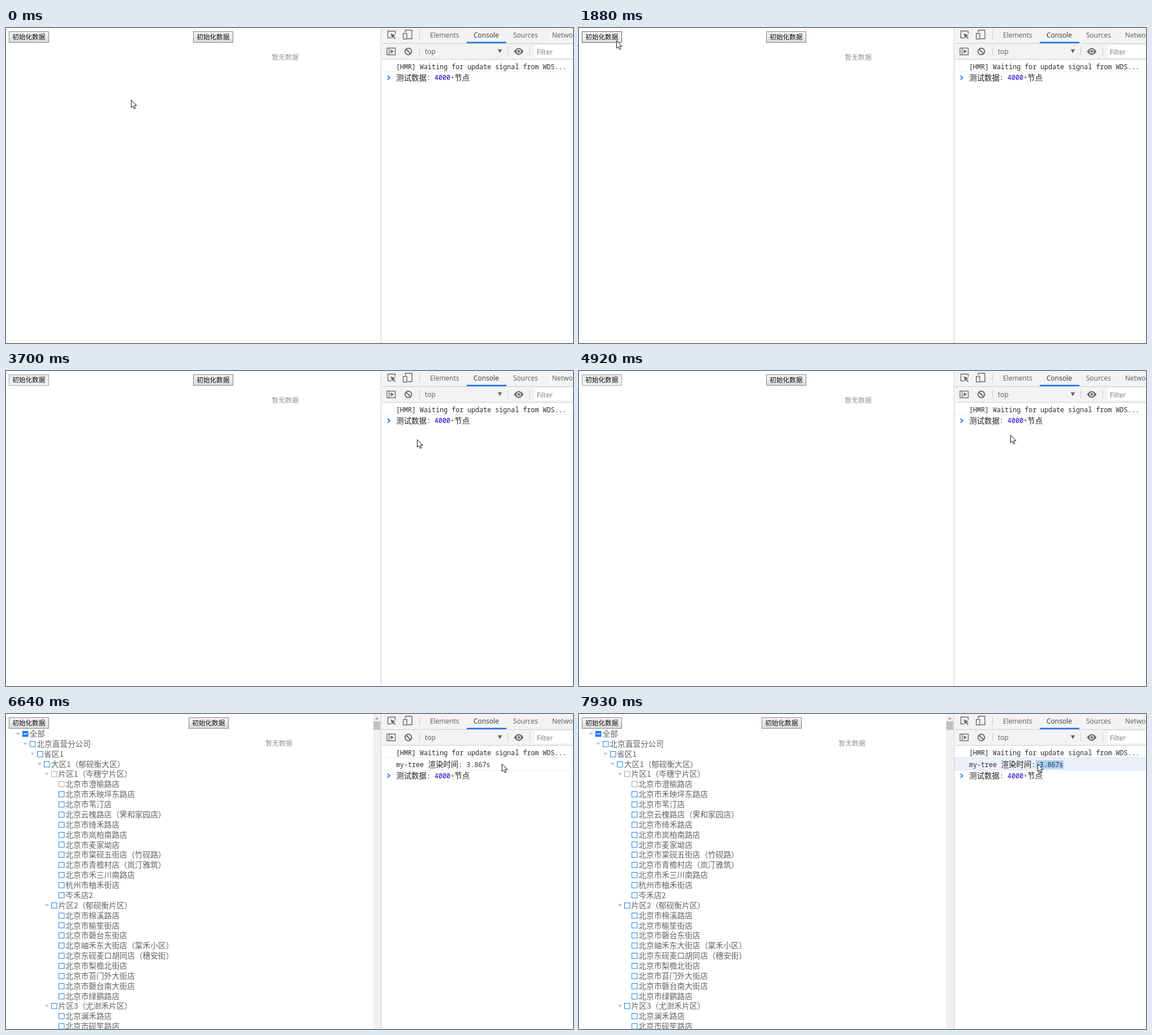
These frames come from a looping animation (1003x558 px, 8000 ms). An HTML page:

```html
<!DOCTYPE html>
<html lang="zh-CN">
<head>
<meta charset="utf-8">
<title>my-tree</title>
<style>
html, body { margin: 0; width: 100%; height: 100%; overflow: hidden; background: #fff; }
svg { display: block; width: 1003px; height: 558px; }
text { font-family: "Noto Sans CJK SC", "Noto Sans CJK", "Noto Sans", sans-serif; white-space: pre; }
.ui { font: 12px "Open Sans", "Noto Sans", sans-serif; fill: #5a5a5a; }
.mono { font: 11.7px "Noto Sans Mono", "DejaVu Sans Mono", monospace; fill: #2a2a2a; }
.cjk { font-size: 13.4px; fill: #222; }
.btn { font-size: 11.6px; fill: #111; }
.none { font-size: 11.9px; fill: #909399; }
.node { font-size: 13.65px; fill: #606266; }
</style>
</head>
<body>
<svg id="stage" viewBox="0 0 1003 558">
  <defs>
    <linearGradient id="normal" x2="0" y2="1"><stop stop-color="#f6f6f6"/><stop offset="1" stop-color="#dadada"/></linearGradient>
    <linearGradient id="hover" x2="0" y2="1"><stop stop-color="#fafafa"/><stop offset="1" stop-color="#e0e0e0"/></linearGradient>
    <linearGradient id="pressed" x2="0" y2="1"><stop stop-color="#e6e6e6"/><stop offset="1" stop-color="#f4f4f4"/></linearGradient>
  </defs>
</svg>
<script>
const LOOP = 8000, PRESSED = 1900, RENDERED = 6000, DRAG = 7000;
const CIRCLE = 2670, LEAVE = 5610;
const BLUE = '#1a73e8', TREE_BLUE = '#1f7fe8', ICON = '#6a6a6a', BAR = '#f3f3f3';
const BORDER = { normal: '#858585', hover: '#606060', pressed: '#a0a0a0' };
const stage = document.getElementById('stage');

function add(parent, tag, attrs = {}, label) {
  const el = document.createElementNS('http://www.w3.org/2000/svg', tag);
  for (const key in attrs) el.setAttribute(key, attrs[key]);
  if (label !== undefined) el.textContent = label;
  return parent.appendChild(el);
}
const group = () => add(stage, 'g');
const rect = (p, x, y, width, height, fill, stroke = 'none', line = 1) =>
  add(p, 'rect', { x, y, width, height, fill, stroke, 'stroke-width': line });
const path = (p, d, fill, stroke = 'none', line = 1) =>
  add(p, 'path', { d, fill, stroke, 'stroke-width': line });
const circle = (p, cx, cy, r, fill, stroke, line) =>
  add(p, 'circle', { cx, cy, r, fill, stroke, 'stroke-width': line });
const text = (p, x, y, cls, label, color = '') => {
  add(p, 'text', { x, y, class: cls }, label).style.fill = color;
};
const move = (el, x, y) => el.setAttribute('transform', `translate(${x} ${y})`);
const show = (el, on) => el.setAttribute('display', on ? 'inline' : 'none');

// Page
function button(x) {
  const g = group();
  const box = rect(g, x + .5, 6.5, 70, 19, 'url(#normal)', BORDER.normal);
  text(g, x + 6.3, 20.3, 'btn', '初始化数据');
  return { g, box };
}
const first = button(5), second = button(331);
const empty = group();
text(empty, 470, 56, 'none', '暂无数据');

const tree = group();
const outline = `全部
 北京直营分公司
  省区1
   大区1（郁砚衡大区）
    片区1（岑穗宁片区）
     北京市澄榆路店
     北京市禾映坪东路店
     北京市苇汀店
     北京云槐路店（霁和家园店）
     北京市绮禾路店
     北京市岚柏南路店
     北京市麦家坳店
     北京市棠砚五街店（竹砚路）
     北京市青檐村店（岚汀雅筑）
     北京市禾三川南路店
     杭州市柚禾街店
     岑禾店2
    片区2（郁砚衡片区）
     北京市棉溪路店
     北京市榆笙街店
     北京市磬台东街店
     北京岫禾东大街店（棠禾小区）
     北京东砚麦口胡同店（穗安街）
     北京市梨檐北街店
     北京市苔门外大街店
     北京市磬台南大街店
     北京市绿鹂路店
    片区3（尤澍禾片区）
     北京澜禾路店
     北京市砚笙路店`;
outline.split('\n').forEach((row, i) => {
  const label = row.trim(), depth = row.length - label.length;
  const x = 12.75 * depth, y = 34.9 + 17.87 * i;
  const bx = Math.round(29 + x) + .5, by = Math.round(y - 5) + .5;
  const disabled = i === 4 || i === 5;
  if (depth < 5) path(tree, `M${17.8 + x} ${y - 2}h7l-3.5 4.2z`, '#b8bcc4');
  rect(tree, bx, by, 9.5, 9.5, i ? '#fff' : TREE_BLUE, disabled ? '#a4a4a4' : TREE_BLUE);
  if (!i) rect(tree, bx + 1.5, by + 4, 6.5, 1.6, '#fff');
  text(tree, 41.6 + x, y + 5.1, 'node', label);
});
rect(tree, 649, 0, 14, 558, '#f1f1f1');
path(tree, 'M652.5 9.5h7l-3.5 -4z', '#a3a3a3');
rect(tree, 650, 13, 12, 15, '#c1c1c1');

// Developer tools
const panel = group();
rect(panel, 663, 0, 1, 558, '#c9c9c9');
rect(panel, 665, 0, 338, 55, BAR);
for (const y of [27, 55]) rect(panel, 665, y, 338, 1, '#cdcdcd');
rect(panel, 815, 24.5, 70, 2.5, BLUE);
text(panel, 750, 17, 'ui', 'Elements');
text(panel, 827, 17, 'ui', 'Console', '#333');
text(panel, 897, 17, 'ui', 'Sources');
text(panel, 966, 17, 'ui', 'Network');
path(panel, 'M731.5 4v16M731.5 33v16M887.5 33v16M926.5 33v16', 'none', '#ccc');

path(panel, 'M681 17.5h-5.5v-12h13v5', 'none', ICON, 1.4);
path(panel, 'M680.5 9.5l8.7 3.6-3.6 1.3 3.6 3.6-1.4 1.4-3.6-3.6-1.4 3.4z', ICON);
path(panel, 'M706.5 8v-4h11.5v15h-8', 'none', ICON, 1.4);
rect(panel, 702.7, 9.7, 6.3, 9.8, BAR, ICON, 1.4);
rect(panel, 674, 35.5, 14.5, 12, 'none', ICON, 1.4);
path(panel, 'M677.8 35.5v12', 'none', ICON, 1.3);
path(panel, 'M680.5 38l5.5 3.5-5.5 3.5z', ICON);
circle(panel, 711.7, 41.5, 5.8, 'none', ICON, 1.9);
path(panel, 'M707.7 37.5l8 8', 'none', ICON, 1.9);
text(panel, 741, 46, 'ui', 'top');
path(panel, 'M869.8 37.8h7.6l-3.8 6.6z', '#666');
path(panel, 'M898.5 41.5q8.5 -12 17 0q-8.5 12 -17 0z', ICON);
circle(panel, 907, 41.5, 3.1, ICON, BAR, 1.5);
rect(panel, 935, 30, 68, 22, '#fff');
text(panel, 939, 46.5, 'ui', 'Filter', '#777');

text(panel, 690, 72.5, 'mono', '[HMR] Waiting for update signal from WDS...');
rect(panel, 665, 77, 338, 1, '#efefef');

const log = group();
rect(log, 665, 99, 338, 1, '#efefef');
const selection = add(log, 'g');
rect(selection, 665, 77.5, 338, 22, '#ecf1f9', '#dbe5f3');
const marked = rect(selection, 808, 82, 49, 15, '#a9cff5');
text(log, 690, 93.5, 'mono', 'my-tree');
text(log, 746.8, 94, 'cjk', '渲染时间');
text(log, 800.5, 93.5, 'mono', ': 3.867s');

const prompt = group();
path(prompt, 'M674.8 84.5l4 3.6-4 3.6', 'none', BLUE, 1.7);
text(prompt, 690.3, 92.8, 'cjk', '测试数据');
text(prompt, 744, 92.3, 'mono', ':');
text(prompt, 758, 92.3, 'mono', '4000', '#1c00cf');
text(prompt, 786.3, 92.3, 'mono', '+', '#a5602a');
text(prompt, 793.3, 92.8, 'cjk', '节点');

const pointer = group();
const arrow = path(pointer, 'M.5 .5V14L3.6 11.2 5.7 16 8 15 5.9 10.3H10Z', '#fff', '#111');
const beam = path(pointer, 'M-3.5 -7.5h2.5l1 1 1-1h2.5M0 -6.5v13M-3.5 7.5h2.5l1-1 1 1h2.5', 'none', '#222');

// The mouse circles the prompt while the page is busy; the loops flatten and rise
function circling(t) {
  const age = t - CIRCLE, u = Math.min(1, age / 2250);
  const angle = (135 - .338 * age) * Math.PI / 180;
  const rx = 61 + 12 * Math.cos(age / 2060 * 2 * Math.PI);
  const ry = 52 * .35 ** u;
  return [768 + rx * Math.cos(angle), 110 - 15 * u + ry * Math.sin(angle)];
}

// Each glide eases from wherever the mouse is
const glides = [
  { from: 390, to: 1170, end: [14, 13] },
  { from: 1180, to: 1640, end: [73, 32] },
  { from: 1640, to: 2000, end: [63, 19] },
  { from: 2320, to: CIRCLE, end: circling(CIRCLE) },
  { from: LEAVE, to: 6600, end: [877, 88], start: circling(LEAVE) },
  { from: 6800, to: DRAG, end: [857, 86] },
  { from: DRAG, to: 7250, end: [800, 86] },
  { from: 7650, to: 7930, end: [811, 88] }
];

function mouse(t) {
  if (t >= CIRCLE && t < LEAVE) return circling(t);
  let at = [221, 127];
  for (const { from, to, end, start = at } of glides) {
    if (t < from) break;
    const u = Math.min(1, (t - from) / (to - from)), ease = u * u * (3 - 2 * u);
    at = start.map((v, n) => v + (end[n] - v) * ease);
  }
  return at;
}

function render(t) {
  const [x, y] = mouse(t).map(Math.round);
  const done = t >= RENDERED;
  const over = x >= 5 && x <= 76 && y >= 6 && y <= 26;
  const state = done ? 'normal' : t >= PRESSED ? 'pressed' : over ? 'hover' : 'normal';

  first.box.setAttribute('fill', `url(#${state})`);
  first.box.setAttribute('stroke', BORDER[state]);
  move(second.g, done ? -8 : 0, 0);
  move(empty, done ? -11 : 0, 0);
  move(prompt, 0, done ? 21.3 : 0);
  show(tree, done);
  show(log, done);
  show(selection, t >= DRAG);

  // Selection grows leftwards by whole characters
  const chars = t < 7250 ? Math.max(0, Math.min(7, Math.round((857 - x) / 7))) : 7;
  marked.setAttribute('x', 857 - 7 * chars);
  marked.setAttribute('width', 7 * chars);

  const overText = t > DRAG - 60 && t < 7800;
  show(arrow, !overText);
  show(beam, overText);
  move(pointer, x, y);
}

function tick() {
  render(performance.now() % LOOP);
  requestAnimationFrame(tick);
}
tick();
</script>
</body>
</html>
```
